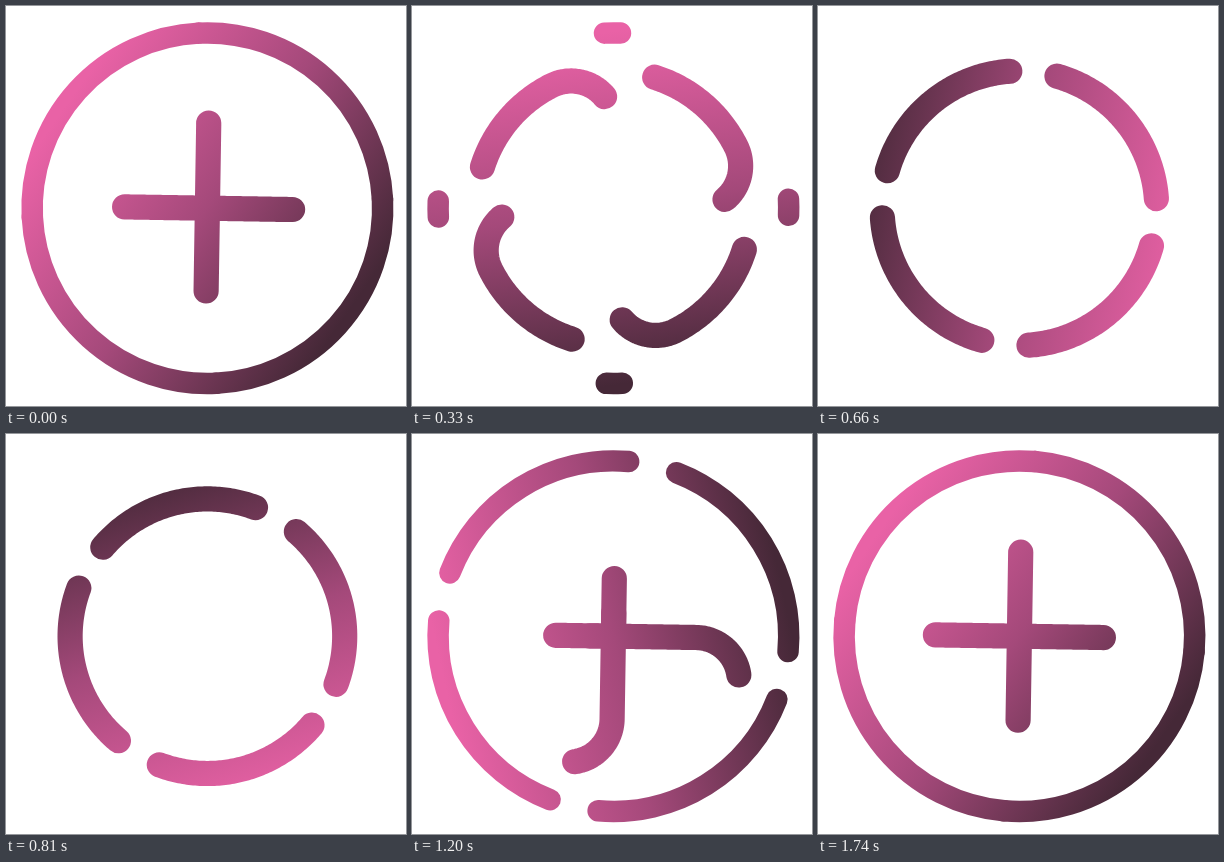
These frames come from a looping animation (400x400 px, 3860 ms). An HTML page with a canvas:

```html
<!DOCTYPE html>
<html lang="en">
<head>
<meta charset="utf-8">
<title>Plus loader</title>
<style>
  html, body { margin: 0; width: 100%; height: 100%; overflow: hidden; background: #fff; }
  canvas { display: block; width: 400px; height: 400px; }
</style>
</head>
<body>
<canvas id="stage" width="400" height="400"></canvas>
<script>
const ctx = document.getElementById('stage').getContext('2d');
const LOOP = 3860, STEP = 30, MOVE_END = 1740;
const RAD = Math.PI / 180;
const CENTER = [201.4, 202.2];

// Track of a stroke: straight arm, hook tangent to the orbit, orbit, hook, arm.
const ARM = 83, ORBIT = 137.3, LENGTH = 168, TURN = 630 * RAD;
const HOOK = (ORBIT ** 2 - ARM ** 2) / (2 * ORBIT);
const JOIN = Math.atan(HOOK / ARM);
const HOOK_LENGTH = HOOK * (Math.PI / 2 + JOIN);
const TRACK = 2 * (ARM + HOOK_LENGTH) + ORBIT * (TURN - 2 * JOIN);

const travel = curve([[0, 1.2], [330, 198], [540, 546], [810, 1221.5],
  [1050, TRACK - 170], [1350, TRACK - 7], [MOVE_END, TRACK]]);
const shadeAngle = curve([[0, 215], [330, 261], [540, 322], [810, 432],
  [1050, 498], [1350, 550], [1650, 575]]);

// Monotone cubic through [time, value] keys, at rest on both ends.
function curve(keys) {
  const rate = i => (keys[i + 1][1] - keys[i][1]) / (keys[i + 1][0] - keys[i][0]);
  const slopes = keys.map((key, i) => {
    if (i === 0 || i === keys.length - 1) return 0;
    const before = rate(i - 1), after = rate(i);
    return 2 * before * after / (before + after);
  });
  return time => {
    const last = keys.length - 1;
    if (time >= keys[last][0]) return keys[last][1];
    const i = keys.findIndex((key, n) => time < keys[n + 1][0]);
    const [t0, v0] = keys[i], [t1, v1] = keys[i + 1];
    const span = t1 - t0, x = (time - t0) / span, y = 1 - x;
    return v0 * (1 + 2 * x) * y * y + v1 * x * x * (3 - 2 * x)
      + span * x * y * (slopes[i] * y - slopes[i + 1] * x);
  };
}

const clamp = x => Math.min(1, Math.max(0, x));

function rotate([x, y], angle) {
  const c = Math.cos(angle), s = Math.sin(angle);
  return [x * c - y * s, x * s + y * c];
}

// Point at distance d along the track of the arm that points up.
function trackPoint(d) {
  if (d > TRACK / 2) {
    const [x, y] = trackPoint(TRACK - d);
    return rotate([-x, y], -TURN);
  }
  if (d < ARM) return [0, -d];
  if (d < ARM + HOOK_LENGTH) {
    const a = (d - ARM) / HOOK;
    return [HOOK * (Math.cos(a) - 1), -ARM - HOOK * Math.sin(a)];
  }
  return rotate([0, -ORBIT], -JOIN - (d - ARM - HOOK_LENGTH) / ORBIT);
}

function drawStroke(tail, head, angle) {
  const parts = Math.max(1, Math.ceil((head - tail) / 2));
  ctx.beginPath();
  for (let i = 0; i <= parts; i++) {
    const point = trackPoint(tail + (head - tail) * i / parts);
    ctx.lineTo(...rotate(point, angle));
  }
  ctx.stroke();
}

function drawStrokes(time) {
  const middle = travel(time);
  const tail = middle - LENGTH / 2, head = middle + LENGTH / 2;
  const tilt = 0.9 * RAD;
  ctx.lineWidth = 25.2;
  for (const quarter of [0, 1]) drawStroke(tail, head, tilt + quarter * Math.PI / 2);

  // The second pair grows out of the plus and shrinks back into it.
  const grow = clamp(time / 300), shrink = clamp((1340 - time) / 290);
  if (!grow || !shrink) return;
  const from = Math.max(0, shrink < 1 ? head - LENGTH * shrink : tail);
  const to = Math.min(TRACK, grow < 1 ? tail + LENGTH * grow : head);
  if (to <= from) return;
  for (const quarter of [2, 3]) drawStroke(from, to, tilt + quarter * Math.PI / 2);
}

function drawRing(time) {
  let start, end;
  if (time < 700) {
    const gone = (time / 340) ** 2;
    start = -2.9;
    end = 87.1 - 90 * gone;
  } else {
    const left = 1 - clamp((time - 1004) / 340);
    end = 5;
    start = 5 - 90 * (1 - left * left);
  }
  if (end <= start) return;
  ctx.lineWidth = 21.5;
  for (let arm = -90; arm < 270; arm += 90) {
    ctx.beginPath();
    ctx.arc(0, 0, 175.3, (arm + start) * RAD, (arm + end) * RAD);
    ctx.stroke();
  }
}

function shade(time) {
  const [x, y] = rotate([1, 0], shadeAngle(time) * RAD);
  const gradient = ctx.createLinearGradient(175 * x, 175 * y, -175 * x, -175 * y);
  gradient.addColorStop(0, '#e962a6');
  gradient.addColorStop(0.5, '#a4497a');
  gradient.addColorStop(1, '#452837');
  return gradient;
}

function draw(now) {
  const time = Math.min(MOVE_END, Math.floor((now % LOOP) / STEP) * STEP);
  ctx.setTransform(1, 0, 0, 1, 0, 0);
  ctx.clearRect(0, 0, 400, 400);
  ctx.translate(...CENTER);
  ctx.lineCap = ctx.lineJoin = 'round';
  ctx.strokeStyle = shade(time);
  drawRing(time);
  drawStrokes(time);
}

const began = performance.now();
function tick() {
  draw(performance.now() - began);
  requestAnimationFrame(tick);
}
tick();
</script>
</body>
</html>
```
